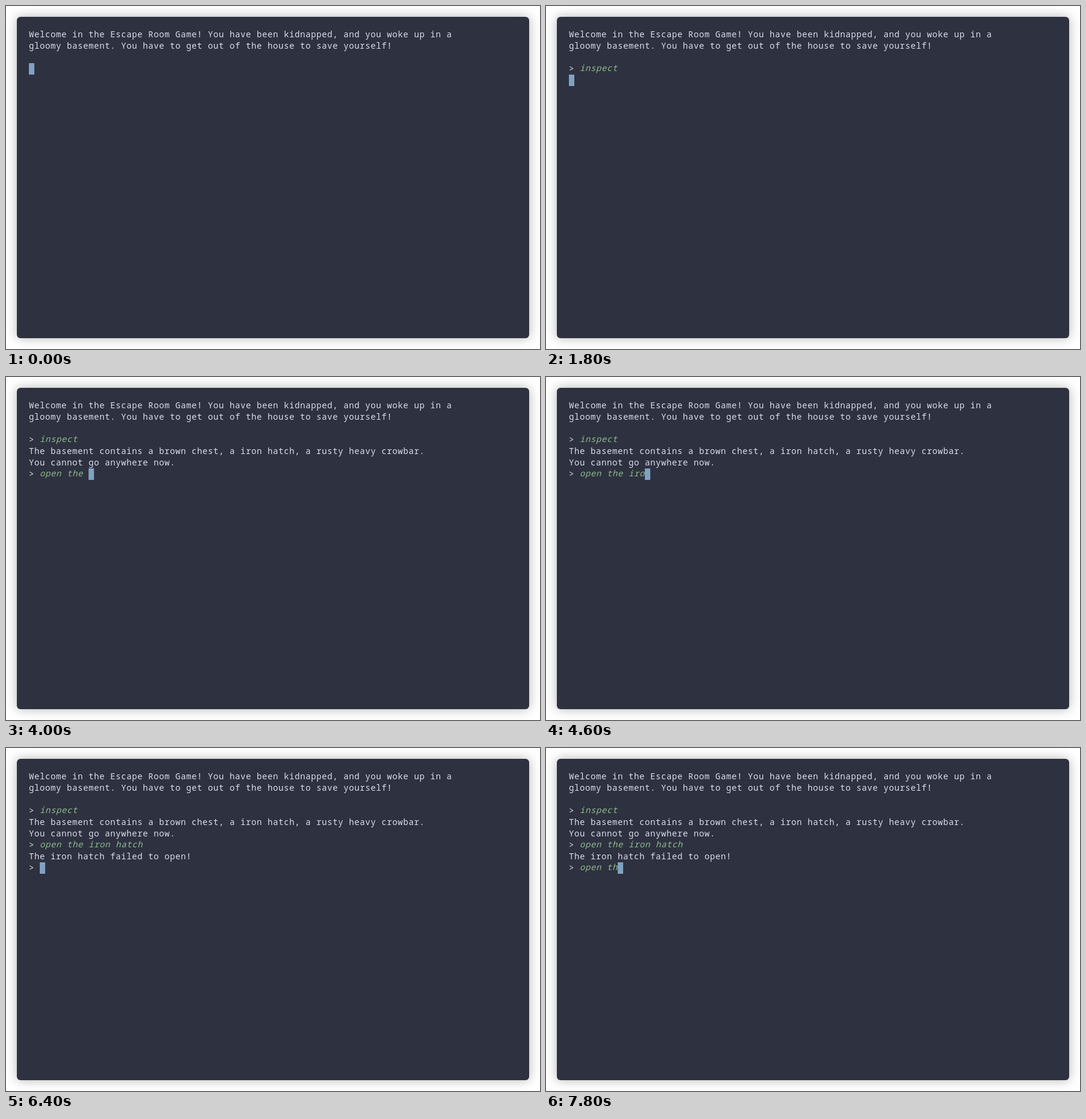
An HTML page that plays this animation: 886 px wide and 570 px high, repeating every 8000 ms.

```html
<!DOCTYPE html>
<html lang="en">
<head>
<meta charset="utf-8">
<title>Escape room terminal</title>
<style>
  html, body { margin: 0; width: 100%; height: 100%; overflow: hidden; background: #fff; }
  #window {
    position: absolute; left: 18px; top: 18px; width: 850px; height: 534px;
    border-radius: 6px; background: #2e3140; box-shadow: 0 0 18px rgba(0, 0, 0, .3);
  }
  svg { position: absolute; left: 0; top: 0; }
  text {
    font: 14px "Noto Sans Mono", monospace;
    letter-spacing: .6px; /* fills the 9px cell */
    white-space: pre; fill: #d8dee9;
  }
  .command { font-style: italic; fill: #8fbc8b; }
  #cursor { fill: #81a1c1; }
</style>
</head>
<body>
<div id="window"></div>
<svg width="886" height="570">
  <g id="screen"></g>
  <rect id="cursor" width="9" height="19"/>
</svg>
<script>
const STEP = 200, LEFT = 38, TOP = 38, CELL = 9, LINE = 19, BASELINE = 14;
const PROMPT = "> ";

const intro = [
  "Welcome in the Escape Room Game! You have been kidnapped, and you woke up in a",
  "gloomy basement. You have to get out of the house to save yourself!",
  "", ""
];
// wait: steps spent on the empty line before the reply appears
const session = [
  { command: "inspect", wait: 2, reply: [
    "The basement contains a brown chest, a iron hatch, a rusty heavy crowbar.",
    "You cannot go anywhere now."
  ] },
  { command: "open the iron hatch", wait: 1, reply: ["The iron hatch failed to open!"] },
  { command: "open th", wait: 0, reply: [] }
];

function buildScreens() {
  const screens = [intro];
  let done = intro.slice(0, -1);
  for (const { command, wait, reply } of session) {
    for (let n = 0; n <= command.length; n++) {
      screens.push([...done, PROMPT + command.slice(0, n)]);
    }
    done = [...done, PROMPT + command];
    for (let n = 0; n < wait; n++) screens.push([...done, ""]);
    done = [...done, ...reply];
  }
  return screens;
}

function rowMarkup(row, index) {
  const y = TOP + index * LINE + BASELINE;
  if (!row.startsWith(PROMPT)) return `<text x="${LEFT}" y="${y}">${row}</text>`;
  const commandX = LEFT + PROMPT.length * CELL;
  return `<text x="${LEFT}" y="${y}">&gt;</text>` +
    `<text class="command" x="${commandX}" y="${y - 1}">${row.slice(PROMPT.length)}</text>`;
}

const screens = buildScreens();
const screen = document.getElementById("screen");
const cursor = document.getElementById("cursor");
let shown = -1;

function draw(now) {
  const step = Math.floor(now / STEP) % screens.length;
  if (step !== shown) {
    const rows = screens[step], last = rows.length - 1;
    screen.innerHTML = rows.map(rowMarkup).join("");
    cursor.setAttribute("x", LEFT + rows[last].length * CELL);
    cursor.setAttribute("y", TOP + last * LINE);
    shown = step;
  }
}

const start = performance.now();
function tick() {
  draw(performance.now() - start);
  requestAnimationFrame(tick);
}
tick();
</script>
</body>
</html>
```
